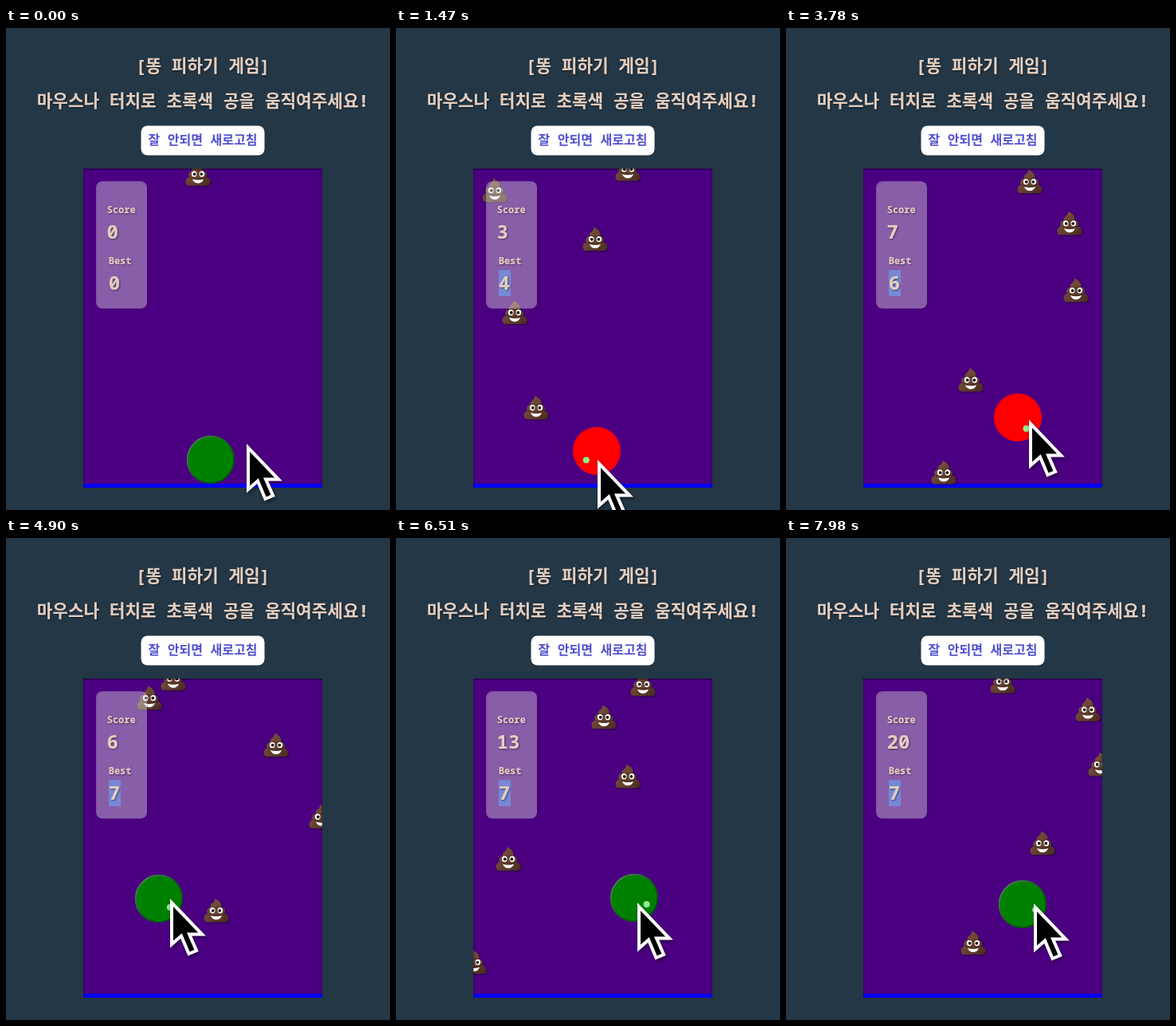
An HTML page for the animation above (8 s loop, 482 by 604 pixels).

```html
<!DOCTYPE html>
<html lang="ko">
<head>
<meta charset="utf-8">
<style>
  html, body { margin: 0; width: 100%; height: 100%; overflow: hidden; background: #233746; }
  svg { display: block; width: 100vw; height: 100vh; }
  text { font: bold 12px "Noto Sans Mono", "Noto Sans CJK KR", "Noto Sans CJK", monospace; fill: #e3cdbf; }
  .title { font-size: 21.3px; text-anchor: middle; }
  .button { font-size: 16px; text-anchor: middle; fill: #5150cf; }
  .num { font-size: 24px; }
</style>
</head>
<body>
<svg viewBox="0 0 482 604">
  <defs>
    <clipPath id="field"><rect x="97" y="176" width="300" height="400"/></clipPath>
    <filter id="soft" x="-30%" y="-30%" width="160%" height="160%">
      <feDropShadow dx="1" dy="1" stdDeviation=".8" flood-color="#000" flood-opacity=".5"/>
    </filter>
    <filter id="deep" x="-30%" y="-30%" width="160%" height="160%">
      <feDropShadow dx="1.5" dy="2.5" stdDeviation="2" flood-color="#000" flood-opacity=".5"/>
    </filter>
    <linearGradient id="brown" x2="1" y2="1">
      <stop offset="0" stop-color="#7f5848"/>
      <stop offset=".5" stop-color="#684332"/>
      <stop offset="1" stop-color="#472a1e"/>
    </linearGradient>
    <linearGradient id="rim" x2="1" y2="1">
      <stop offset=".1" stop-color="#5c7a62"/>
      <stop offset=".5" stop-color="#0b6a10"/>
      <stop offset=".9" stop-color="#07391c"/>
    </linearGradient>
    <g id="poop" filter="url(#soft)">
      <path fill="url(#brown)" d="M-2-15C3-13 8-9 6-4C11-3 12 1 10 4C17 5 17 14.500 11 14.500L-11 14.500C-17 14.500-17 5-11 4C-13 0-11-3-7-4C-9-9-1-9-2-15Z"/>
      <path fill="none" stroke="#3f261b" stroke-width="1.100" opacity=".65" d="M-6-4Q2-2 6-5M-10 4Q0 8 10 4"/>
      <g fill="#fff">
        <ellipse cx="-4.800" cy="0" rx="3.300" ry="3.700"/>
        <ellipse cx="4.800" cy="0" rx="3.300" ry="3.700"/>
        <path d="M-7 6.500Q0 8.500 7 6.500Q5 11.500 0 11.500T-7 6.500Z"/>
      </g>
      <g fill="#1d1412"><circle cx="-4.300" cy=".2" r="1.900"/><circle cx="4.300" cy=".2" r="1.900"/></g>
    </g>
  </defs>

  <rect width="482" height="604" fill="#233746"/>
  <g filter="url(#soft)">
    <text class="title" x="247" y="55">[똥 피하기 게임]</text>
    <text class="title" x="247" y="99">마우스나 터치로 초록색 공을 움직여주세요!</text>
  </g>
  <rect x="169.500" y="122.500" width="155" height="37" rx="8" fill="#fff"/>
  <text class="button" x="247" y="146">잘 안되면 새로고침</text>

  <g clip-path="url(#field)">
    <rect x="97" y="176" width="300" height="400" fill="#4b0082"/>
    <rect x="97" y="571" width="300" height="5" fill="#00f"/>
    <g id="poops"></g>
    <g id="ball"><circle id="disc" r="30"/><circle id="edge" r="29.300" fill="none" stroke="url(#rim)" stroke-width="1.800"/></g>
    <circle id="grip" r="4" fill="#90ee90"/>
    <path d="M97 176.500H397" stroke="#000" stroke-opacity=".35" stroke-width="3"/>
    <path d="M97 176V576M397 176V576" stroke="#000" stroke-opacity=".22" stroke-width="3"/>
  </g>

  <rect x="113" y="192" width="64" height="159.500" rx="8" fill="#fff" fill-opacity=".31" filter="url(#soft)"/>
  <rect id="mark" x="129" y="303.500" width="15" height="32.500" fill="#7689d6"/>
  <g filter="url(#soft)">
    <text x="126.700" y="231.500">Score</text>
    <text class="num" id="score" x="126.600" y="264"></text>
    <text x="128.700" y="295.500">Best</text>
    <text class="num" id="best" x="128.700" y="328"></text>
  </g>

  <path id="cursor" filter="url(#deep)" stroke="#fff" stroke-width="4" d="M2 5V57L14 46.500L23.500 69L33 65L24 44.500H40Z"/>
</svg>
<script>
const LOOP = 8000, STEP = 70;
const $ = id => document.getElementById(id);

// Drops: column of each one, released at a steady beat
const BEAT = 215.3, FIRST = -7, ORIGIN = 1427;
const columns = [
  241, 300, 126, 176, 149, 250, 124, 291, 111, 98, 191, 299, 382,
  198, 232, 364, 356, 306, 144, 264, 396, 339, 180, 210, 200, 150,
  98, 141, 291, 261, 310, 134, 250, 235, 322, 395, 379, 272
];
const drops = columns.map((x, i) => ({ x, born: i ? ORIGIN + (FIRST + i) * BEAT : -128 }));

const hits = [850, 2190, 3700];
const RED = 1000, RESET_DELAY = 90, GRAB = 550, LIFE = 1075;

// time, pointer x, y, ball x, y
const path = [
  [0, 302, 521, 257, 541],
  [350, 275, 540, 257, 541],
  [550, 256, 548, 256, 541],
  [1000, 258, 546, 255, 536],
  [1470, 253, 541, 252, 530],
  [2190, 166, 540, 158, 535],
  [2730, 251, 500, 242, 487],
  [3250, 258, 498, 248, 489],
  [3680, 252, 505, 240, 500],
  [3780, 305, 491, 291, 488],
  [4150, 300, 480, 287, 478],
  [4500, 240, 465, 227, 463],
  [4900, 206, 452, 192, 452],
  [5300, 250, 452, 237, 452],
  [5900, 330, 456, 318, 454],
  [6510, 303, 457, 299, 451],
  [6900, 382, 455, 365, 452],
  [7350, 372, 460, 357, 458],
  [7980, 311, 458, 297, 459]
];

const slope = (i, c) => (path[i + 1][c] - path[i][c]) / (path[i + 1][0] - path[i][0]);

// Harmonic-mean tangents keep the curve free of overshoot
function tangent(i, c) {
  if (i === 0 || i === path.length - 1) return 0;
  const a = slope(i - 1, c), b = slope(i, c);
  return a * b > 0 ? 2 * a * b / (a + b) : 0;
}

function at(t, c) {
  let i = 0;
  while (i < path.length - 2 && path[i + 1][0] <= t) i++;
  const p = path[i], q = path[i + 1], d = q[0] - p[0];
  const u = Math.min(1, (t - p[0]) / d), v = 1 - u;
  return p[c] * v * v * (1 + 2 * u) + q[c] * u * u * (3 - 2 * u)
    + d * (tangent(i, c) * u * v * v - tangent(i + 1, c) * u * u * v);
}

// Gravity with air drag, stopped by the floor
function fall(age) {
  const s = age * 0.928, tau = 1667;
  return Math.min(557, 176 + 0.001 * tau * (s - tau * (1 - Math.exp(-s / tau))));
}

const move = (el, x, y) => el.setAttribute('transform', `translate(${x.toFixed(2)} ${y.toFixed(2)})`);
const show = (el, on) => el.setAttribute('visibility', on ? 'visible' : 'hidden');
const count = (from, to) => drops.filter(d => d.born > from && d.born <= to).length;

for (const d of drops) {
  d.el = document.createElementNS('http://www.w3.org/2000/svg', 'use');
  d.el.setAttribute('href', '#poop');
  $('poops').append(d.el);
}

function draw(t) {
  for (const d of drops) {
    const age = t - d.born, on = age >= 0 && age < LIFE;
    show(d.el, on);
    if (on) move(d.el, d.x, fall(age));
  }

  let start = 0, best = 0;
  for (const reset of hits.map(h => h + RESET_DELAY).filter(r => r <= t)) {
    best = Math.max(best, count(start, reset));
    start = reset;
  }
  $('score').textContent = count(start, t);
  $('best').textContent = best;

  const red = hits.some(h => t >= h && t < h + RED);
  const x = at(t, 3), y = at(t, 4);
  $('disc').setAttribute('fill', red ? '#f00' : '#008000');
  show($('edge'), !red);
  move($('ball'), x, y);

  const angle = (20 + 119 * Math.exp((1470 - t) / 1800)) * Math.PI / 180;
  move($('grip'), x + 17.5 * Math.cos(angle), y + 17.5 * Math.sin(angle));
  show($('grip'), t >= GRAB);
  show($('mark'), t >= GRAB);
  move($('cursor'), at(t, 1), at(t, 2));
}

const begin = performance.now();
function tick() {
  const t = (performance.now() - begin) % LOOP;
  draw(Math.floor(t / STEP) * STEP);
  requestAnimationFrame(tick);
}
tick();
</script>
</body>
</html>
```
